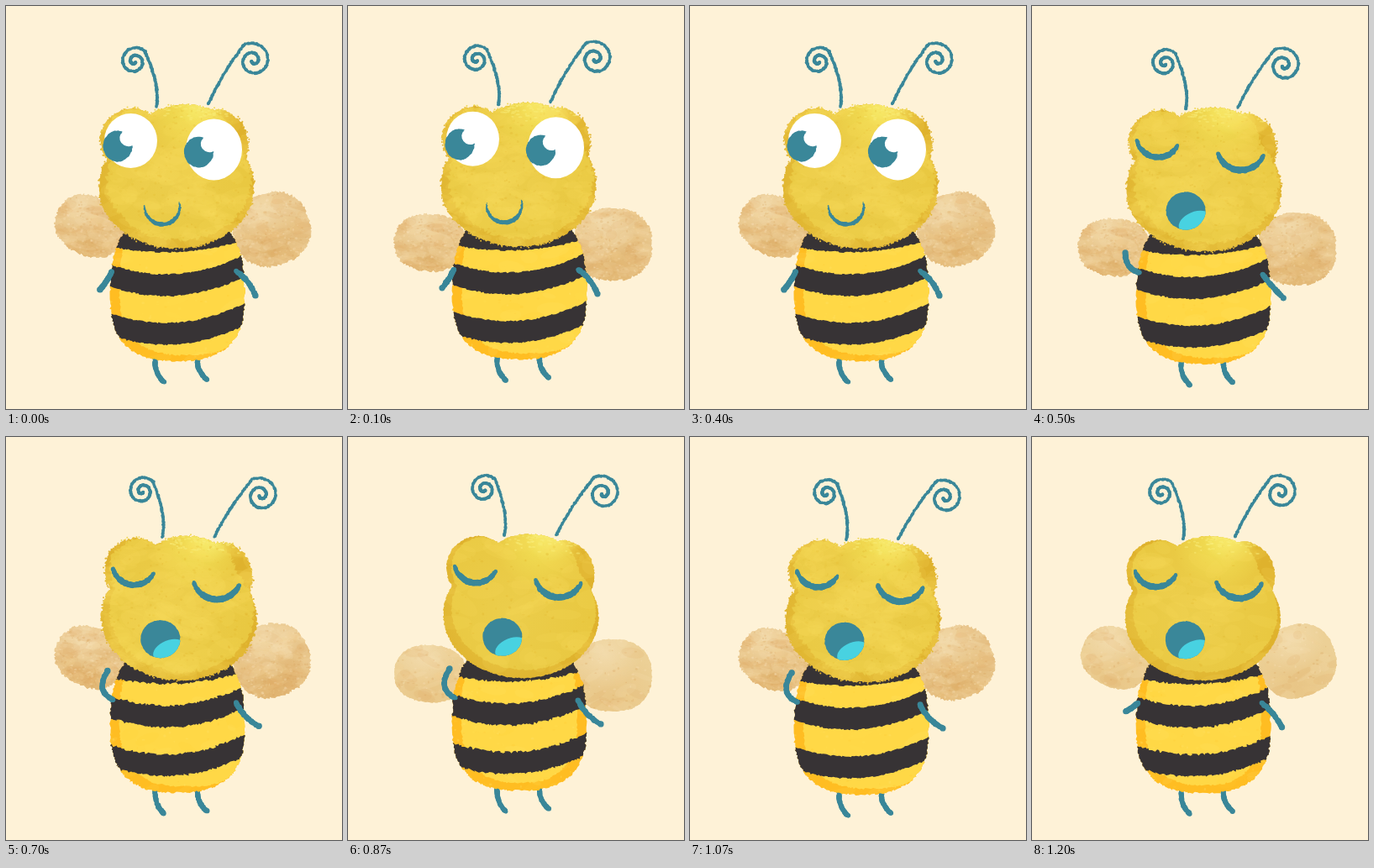
An HTML page with a canvas that plays this animation: 400 by 480 pixels, repeating every 1.23 s.

```html
<!DOCTYPE html>
<html lang="en">
<head>
<meta charset="utf-8">
<title>Singing bee</title>
<style>
  html, body { margin: 0; width: 100%; height: 100%; overflow: hidden; background: #fef2d7; }
  canvas { display: block; width: 400px; height: 480px; }
</style>
</head>
<body>
<canvas id="stage" width="400" height="480"></canvas>
<script>
const g = document.getElementById('stage').getContext('2d');
const LOOP = 1230, SING_AT = 400;
const PAPER = '#fef2d7', TEAL = '#3a8799', INK = '#373335';
const RAD = Math.PI / 180;

// Spans of time cut into equal steps; the single-step spans are holds.
const STEPS = [[0, 30, 1], [30, 230, 5], [230, 500, 6], [500, 570, 1], [570, 700, 4], [700, 770, 1],
  [770, 870, 3], [870, 930, 1], [930, 1100, 5], [1100, 1230, 4]]
  .flatMap(([a, b, n]) => Array.from({ length: n }, (_, i) => a + (b - a) * i / n));

const BOB = [[-160, 3], [190, -4], [535, 3.6], [845, -2.2], [1070, 3], [1420, -4]];
const LEAN = [[380, 0], [600, 1], [1100, 1], [1230, 0]];

let rand;
function seed(s) {
  rand = () => {
    s = s + 0x6D2B79F5 | 0;
    let t = Math.imul(s ^ s >>> 15, 1 | s);
    t = t + Math.imul(t ^ t >>> 7, 61 | t) ^ t;
    return ((t ^ t >>> 14) >>> 0) / 4294967296;
  };
}
const jit = a => (rand() - .5) * 2 * a;
const lerp = (a, b, k) => a + (b - a) * k;
const mix = (p, q, k) => p.map((v, i) => Array.isArray(v) ? mix(v, q[i], k) : lerp(v, q[i], k));

function track(keys, t) {
  if (t <= keys[0][0]) return keys[0][1];
  const i = keys.findIndex(k => k[0] > t);
  const [t0, a] = keys[i - 1], [t1, b] = keys[i];
  return lerp(a, b, (1 - Math.cos(Math.PI * (t - t0) / (t1 - t0))) / 2);
}

// Closed oval; a power above 2 makes it squarer.
function ring(cx, cy, rx, ry, turn = 0, power = 2) {
  const n = Math.ceil((rx + ry) * 2), c = Math.cos(turn * RAD), s = Math.sin(turn * RAD);
  const bend = v => Math.sign(v) * Math.abs(v) ** (2 / power);
  return Array.from({ length: n }, (_, i) => {
    const a = i / n * 2 * Math.PI, x = rx * bend(Math.cos(a)), y = ry * bend(Math.sin(a));
    return [cx + x * c - y * s, cy + x * s + y * c];
  });
}

function arc(cx, cy, r, from, to) {
  return Array.from({ length: 60 }, (_, i) => {
    const a = lerp(from, to, i / 59) * RAD;
    return [cx + r * Math.cos(a), cy + r * Math.sin(a)];
  });
}

// Quadratic curve that passes through b halfway.
function bow([a, b, c]) {
  return Array.from({ length: 50 }, (_, i) => {
    const u = i / 49, v = 1 - u;
    return [0, 1].map(j => v * (1 - 2 * u) * a[j] + 4 * u * v * b[j] + u * (2 * u - 1) * c[j]);
  });
}

function rough(outlines, amount) {
  const path = new Path2D();
  for (const line of outlines) {
    line.forEach(([x, y], i) => path[i ? 'lineTo' : 'moveTo'](x + jit(amount), y + jit(amount)));
    path.closePath();
  }
  return path;
}

function paint(color, amount, ...outlines) {
  const path = rough(outlines, amount);
  g.fillStyle = color;
  g.fill(path);
  return path;
}

function oval(x, y, rx, ry, color, turn = 0) {
  g.fillStyle = color;
  g.beginPath();
  g.ellipse(x, y, rx, ry, turn * RAD, 0, 7);
  g.fill();
}

function chalk(line, width, taper = 0) {
  line.forEach(([x, y], i) => {
    const swell = Math.sin(Math.PI * i / (line.length - 1)) ** .7;
    const r = width / 2 * (1 - taper + taper * swell) * (.8 + rand() * .35);
    oval(x + jit(.4), y + jit(.4), r, r, TEAL);
  });
}

function limb(points) {
  chalk(bow(points), 6);
  oval(...points[2], 3.6, 3.6, TEAL);
}

function glow(x, y, r, color) {
  const f = g.createRadialGradient(x, y, 0, x, y, r);
  f.addColorStop(0, `rgba(${color},.9)`);
  f.addColorStop(1, `rgba(${color},0)`);
  g.fillStyle = f;
  g.fillRect(x - r, y - r, 2 * r, 2 * r);
}

// Dry brush patches and fine specks inside the current clip.
function grain(cx, cy, rx, ry, n, colors, size) {
  for (let i = 0; i < n; i++) {
    const x = cx + jit(rx), y = cy + jit(ry), c = colors[i % colors.length];
    if (i % 4) oval(x, y, .6 + rand() * 1.4, .6 + rand(), `rgba(${c},.3)`);
    else oval(x, y, size * (.4 + rand()), size * (.2 + rand() * .4), `rgba(${c},.14)`, jit(35));
  }
}

function inside(path, detail) {
  g.save();
  g.clip(path);
  detail();
  g.restore();
}

function wing(x, y, rx, ry, turn, smooth) {
  const path = paint(smooth ? '#ecd096' : '#e8c68c', smooth ? .7 : 1.4, ring(x, y, rx, ry, turn, 2.3));
  inside(path, () => {
    glow(x, y + ry * .7, rx * 1.3, smooth ? '232,196,132' : '223,178,108');
    glow(x - rx * .2, y - ry * .6, rx * .9, '243,220,174');
    grain(x, y, rx, ry, smooth ? 130 : 400, ['247,226,186', '215,164,92', '236,203,145'], 12);
  });
}

function stripe(top, height, curl) {
  const edge = y => Array.from({ length: 90 }, (_, i) => {
    const u = i / 42 - 1.06;
    return [204 + 80 * u, y - curl * (17 * u * u + 6 * u)];
  });
  return [...edge(top), ...edge(top + height).reverse()];
}

function body(tone) {
  const egg = (dx, dy, w) => [
    ...ring(204 + dx, 345 + dy, w, 78, 0, 2.6).filter(p => p[1] >= 345 + dy),
    ...ring(204 + dx, 345 + dy, w, 102, 0, 2.6).filter(p => p[1] < 345 + dy)];
  inside(paint('#ffbd22', 1.1, egg(0, 0, 80)), () => {
    paint('#ffd846', 1, tone === 2 ? egg(0, -9, 69) : egg(11, -7, 80));
    grain(204, 340, 80, 85, 170, ['255,226,105', '255,203,50', '255,220,80'], 13);
    paint(INK, tone ? 1.5 : .9, stripe(240, 53, .6), stripe(319, 26, 1), stripe(377, 26, 1));
  });
}

function feeler(stem, cx, cy, r, from, way) {
  chalk(bow(stem), 3.8);
  chalk(Array.from({ length: 120 }, (_, i) => {
    const k = i / 119, a = (from + way * 630 * k) * RAD, d = r * (1 - k) + 1.5 * k;
    return [cx + d * Math.cos(a), cy + d * Math.sin(a)];
  }), 3.8);
}

function openEye(x, y, rx, ry, px, py) {
  oval(x, y, rx, ry, '#fff');
  paint(TEAL, .4, ring(px, py, 17.5, 18.5));
  oval(px + 12, py - 9, 10, 9, '#fff', 30);
  oval(px + 14, py - 15, 9, 9, '#fff');
}

function face(singing) {
  if (!singing) {
    openEye(148.5, 160.5, 31.5, 32.5, 133, 167);
    openEye(247.5, 171, 33.5, 36.5, 229.5, 174);
    chalk(arc(186, 239, 21, 184, -14), 5, .75);
    return;
  }
  chalk(arc(147, 152, 26, 164, 26), 7, .4);
  chalk(arc(246, 162, 29, 160, 22), 7.4, .4);
  inside(paint(TEAL, .3, ring(182, 241, 23.5, 22.5)), () => oval(193, 254, 20, 12, '#48d2e1', -24));
}

function head(tone, singing) {
  const smooth = tone === 2, edge = smooth ? .7 : 1.4;
  feeler([[179, 120], [178, 91], [165.5, 54.5]], 153, 66, 17.5, -43, -1);
  feeler([[241, 117], [259, 82], [283, 46.5]], 294, 65, 21.5, -120, 1);
  const parts = [ring(150, 160, 38, 38), ring(250, 165, 38.5, 42), ring(212, 170, 62, 53), ring(203, 215, 92.5, 74)];
  if (!smooth) for (const [x, y] of parts.flat())
    if (rand() < .35) oval(x + jit(1.8), y + jit(1.8), 1, 1, y < 130 ? '#f0d85a' : '#e2b738');
  inside(paint('#dfb22d', edge, ...parts), () => {
    paint('#e9c841', smooth ? 1 : 2.5, ring(154, 160, 36, 37), ring(214, 168, 56, 56), ring(206, 208, 86, 71));
    glow(190, 210, 95, '236,206,76');
    glow(222, 126, 55, '244,227,88');
    glow(235, 117, 32, '249,238,116');
    grain(203, 203, 95, 88, smooth ? 220 : 620, ['244,216,92', '221,176,42', '238,205,70', '229,188,50'], 20);
    for (let i = 0; i < 90; i++)
      oval(230 + jit(48), 118 + rand() * rand() * 24, 1 + rand() * 2, 1, 'rgba(249,238,120,.5)');
  });
  face(singing);
}

function arms(lean) {
  const down = [[126, 316], [120, 327], [112, 338]];
  const half = [[128, 314], [115, 305], [111, 288]];
  const up = [[128, 313], [115, 299], [121, 278]];
  limb(lean < .6 ? mix(down, half, lean / .6) : mix(half, up, (lean - .6) / .4));
  limb(mix([[274, 316], [287, 328], [297, 345]], [[274, 316], [285, 332], [301, 344]], lean));
}

function draw(t) {
  const lean = track(LEAN, t);
  const flap = t * 9 / LOOP % 1, low = flap > .22 && flap < .67 ? 1 : 0;
  const cycle = t * 8 / LOOP % 1;
  const tone = cycle < .525 || cycle > .88 ? 0 : cycle < .6 ? 1 : 2;
  seed(40 + tone * 17);
  g.fillStyle = PAPER;
  g.fillRect(0, 0, 400, 480);
  g.save();
  g.translate(0, track(BOB, t));
  wing(...mix([100, 262, 42, 35, 25], [98, 284, 43, 34, 3], low), tone === 2);
  wing(...mix([316, 266, 46, 43, -20], [315, 286, 47, 43, 0], low), tone === 2);
  chalk(bow([[178, 416], [179, 434], [188, 448]]), 5.6);
  chalk(bow([[228, 419], [230, 433], [239, 445]]), 5.6);
  body(tone);
  g.save();
  g.translate(200, 285);
  g.rotate(lean * 2.4 * RAD);
  g.translate(-200, -285);
  head(tone, t >= SING_AT);
  g.restore();
  arms(lean);
  g.restore();
}

let shown = -1;
function tick() {
  const t = performance.now() % LOOP;
  const step = STEPS.findLastIndex(s => s <= t);
  if (step !== shown) draw(STEPS[shown = step]);
  requestAnimationFrame(tick);
}
tick();
</script>
</body>
</html>
```
